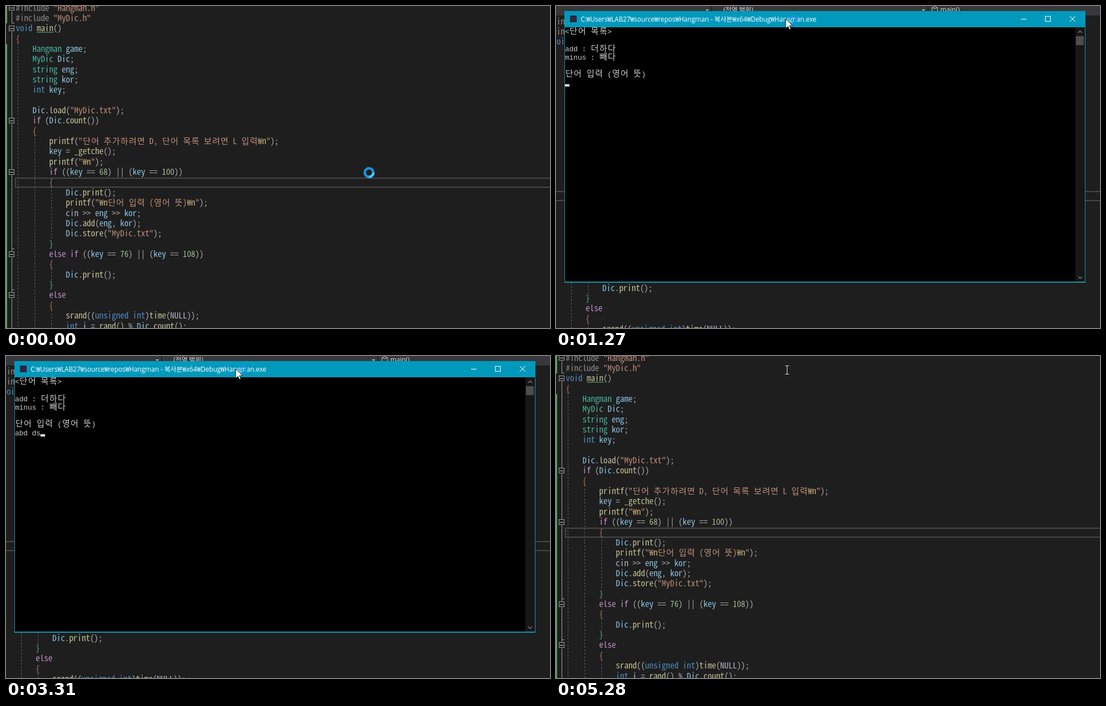
Write an HTML page with a canvas that moves like this. It is 971 px wide and 576 px high and loops after 5.48 s.

```html
<!DOCTYPE html>
<html lang="ko">
<head>
<meta charset="utf-8">
<style>
html, body { margin: 0; width: 100%; height: 100%; overflow: hidden; background: #1e1e1e; }
canvas { display: block; }
</style>
</head>
<body>
<canvas id="stage" width="971" height="576"></canvas>
<script>
const g = document.getElementById('stage').getContext('2d');
const LOOP = 5480;
const CJK = '"Noto Sans Mono CJK KR", "Noto Sans CJK KR", "Noto Sans CJK JP", sans-serif';
const CODE_FONT = '300 15px ' + CJK;
const TERM_FONT = '13px "Liberation Mono", monospace';
const UI_FONT = '11.7px "Open Sans", "Noto Sans CJK KR", sans-serif';

const SOURCE = `#include "Hangman.h"
#include "MyDic.h"
void main()
{
    Hangman game;
    MyDic Dic;
    string eng;
    string kor;
    int key;

    Dic.load("MyDic.txt");
    if (Dic.count())
    {
        printf("단어 추가하려면 D, 단어 목록 보려면 L 입력₩n");
        key = _getche();
        printf("₩n");
        if ((key == 68) || (key == 100))
        {
            Dic.print();
            printf("₩n단어 입력 (영어 뜻)₩n");
            cin >> eng >> kor;
            Dic.add(eng, kor);
            Dic.store("MyDic.txt");
        }
        else if ((key == 76) || (key == 108))
        {
            Dic.print();
        }
        else
        {
            srand((unsigned int)time(NULL));
            int i = rand() % Dic.count();`.split('\n');

const RULES = [
  [/^#include/, '#9b9b9b'],
  [/^₩n/, '#e8c98a'],
  [/^"/, '#d69d85'],
  [/^(void|int|unsigned)\b/, '#569cd6'],
  [/^(if|else)\b/, '#d8a0df'],
  [/^(Hangman|MyDic|string)\b/, '#4ec9b0'],
  [/^\w+(?=\()/, '#dcdcaa'],
  [/^\d+/, '#b5cea8'],
  [/^(NULL|cin)\b/, '#c8c8e0'],
  [/^\w+/, '#9cdcfe'],
  [/^\{/, '#c8846a'],
  [/^\}/, '#6fb3ab'],
  [/^./, '#c0c0c0']
];

function tokens(line) {
  const out = [];
  let quoted = false;
  while (line) {
    const [rule, color] = RULES.find(r => r[0].test(line));
    let text = line.match(rule)[0];
    if (quoted && text !== '₩n') text = line[0];
    const tint = quoted && text !== '₩n' ? '#d69d85' : color;
    if (text === '"') quoted = !quoted;
    out.push([text, tint]);
    line = line.slice(text.length);
  }
  return out;
}
const CODE = SOURCE.map(tokens);

const PATH = ['C:', 'Users', 'LAB27', 'source', 'repos', 'Hangman - 복사본', 'x64', 'Debug', 'Hangman.exe'];
const LIST = ['<단어 목록>', '', 'add : 더하다', 'minus : 빼다', '', '단어 입력 (영어 뜻)'];
const CLOSING = ['',
  PATH.join('\\') + '(프로세스 34740개)이(가) 종료되었습니다(코드: 0개).',
  '디버깅이 중지될 때 콘솔을 자동으로 닫으려면 [도구] -> [옵션] -> [디버깅] > [디버깅이 중지되면 자동으로 콘솔 닫기]를 사용',
  '하도록 설정합니다.',
  '이 창을 닫으려면 아무 키나 누르세요...'];
const TYPED = [[1740, 'a'], [1990, 'ab'], [2190, 'abd'], [2390, 'abd '],
  [2790, 'abd d'], [2980, 'abd ds'], [3570, 'abd dsㄷ'], [3760, 'abd ds다']];

const isWide = c => /[ㄱ-ㅎ가-힣]/.test(c);
const cells = s => [...s].reduce((n, c) => n + (isWide(c) ? 2 : 1), 0);

function rect(color, x, y, w, h) {
  g.fillStyle = color;
  g.fillRect(x, y, w, h);
}

function line(color, width, ...pts) {
  g.strokeStyle = color;
  g.lineWidth = width;
  g.beginPath();
  for (let i = 0; i < pts.length; i += 2) g.lineTo(pts[i], pts[i + 1]);
  g.stroke();
}

// Monospaced text: Hangul takes two cells.
function grid(text, x, y, pitch, font, color) {
  g.fillStyle = color;
  g.textAlign = 'center';
  for (const c of text) {
    const w = isWide(c) ? 2 * pitch : pitch;
    g.font = isWide(c) ? CODE_FONT : font;
    g.fillText(c, x + w / 2, y);
    x += w;
  }
  return x;
}

function label(text, x, y, color) {
  g.font = UI_FONT;
  g.textAlign = 'left';
  g.fillStyle = color;
  g.fillText(text, x, y);
}

function guide(x, from, to) {
  g.setLineDash([3, 3]);
  line('#666', 1, x, from, x, to);
  g.setLineDash([]);
}

function editor(debugging) {
  rect('#1e1e1e', 0, 0, 971, 576);
  g.save();
  if (debugging) g.translate(-24, 24);
  rect('#57a457', 0, -30, 2, 61);
  rect('#57a457', 0, 68, 2, 520);
  line('#a0a0a0', 1, 10.5, 0, 10.5, 30.5, 15, 30.5);
  line('#a0a0a0', 1, 10.5, 40, 10.5, 580);
  for (const y of [434.5, 507.5]) line('#a0a0a0', 1, 10.5, y, 15, y);
  for (const y of [3, 40, 205, 297, 444, 517]) {
    rect('#1e1e1e', 5, y - 5, 11, 11);
    g.strokeStyle = '#a0a0a0';
    g.strokeRect(5.5, y - 4.5, 9, 9);
    line('#d0d0d0', 1, 7, y + .5, 13, y + .5);
  }
  guide(21.5, 66, 576);
  guide(51.5, 231, 576);
  guide(81.5, 323, 418);
  guide(81.5, 470, 492);
  guide(81.5, 544, 576);
  g.strokeStyle = '#464646';
  g.lineWidth = 2;
  g.strokeRect(17, 308, 1000, 16);
  g.globalAlpha = .88;
  CODE.forEach((row, i) => {
    let x = 17.5;
    for (const [text, color] of row) x = grid(text, x, 8.5 + 18.355 * i, 7.45, CODE_FONT, color);
  });
  g.globalAlpha = 1;
  const wave = [];
  for (let x = 55; x <= 85; x += 2) wave.push(x, x % 4 === 3 ? 48 : 46);
  line('#78b878', 1, ...wave);
  g.restore();
  if (debugging) navBar();
}

function navBar() {
  rect('#38383b', 0, 0, 971, 17);
  for (const x of [277, 663]) {
    rect('#242426', x, 0, 2, 13);
    g.fillStyle = '#bbb';
    g.beginPath();
    g.moveTo(x - 10, 6);
    g.lineTo(x - 4, 6);
    g.lineTo(x - 7, 9);
    g.fill();
  }
  label('(전역 범위)', 299, 11, '#ddd');
  label('main()', 686, 11, '#ddd');
  line('#bbb', 1, 671, 3, 676, 1, 681, 3, 681, 9, 676, 11, 671, 9, 671, 3, 676, 5, 681, 3);
}

function consoleWindow(title, rows, caret) {
  rect('#1792ae', 15, 9, 930, 486);
  rect('#0099bc', 15, 9, 930, 29);
  rect('#000', 16, 38, 911, 455);
  rect('#171717', 927, 38, 17, 455);
  rect('#4d4d4d', 928, 54, 14, 16);
  line('#777', 1.5, 932, 48, 935.5, 44.5, 939, 48);
  line('#777', 1.5, 932, 484, 935.5, 487.5, 939, 484);
  rect('#30243f', 25, 17, 12, 12);
  label(title, 44, 27.5, '#fff');
  line('#fff', 1, 830, 23.5, 840, 23.5);
  g.strokeRect(873.5, 18.5, 9, 9);
  line('#fff', 1, 917, 18, 927, 28);
  line('#fff', 1, 927, 18, 917, 28);
  rows.forEach((row, i) => grid(row, 16, 50 + 15.25 * i, 7.59, TERM_FONT, '#ccc'));
  if (caret) {
    const [col, row] = caret;
    rect('#fff', 16 + col * 7.59, Math.round(48.7 + 15.25 * row), 8, 4);
  }
}

function ring(x, y, r, t) {
  const width = r * .46, a = t / 1000 * Math.PI * 2;
  g.lineWidth = width;
  for (const [color, from, to] of [['#1e90dc', 0, 6.2832], ['#4cc4f4', a, a + 1.6]]) {
    g.strokeStyle = color;
    g.beginPath();
    g.arc(x, y, r - width / 2, from, to);
    g.stroke();
  }
}

function arrow(x, y) {
  const pts = [0, 0, 0, 17, 4, 13.3, 6.7, 19, 9.2, 18, 6.6, 12.3, 12, 12];
  g.beginPath();
  for (let i = 0; i < pts.length; i += 2) g.lineTo(x + pts[i], y + pts[i + 1]);
  g.closePath();
  g.fillStyle = '#fff';
  g.fill();
  g.strokeStyle = '#000';
  g.lineWidth = .8;
  g.stroke();
}

const ease = (t, from, to) => Math.min(1, Math.max(0, (t - from) / (to - from)));
const mix = (a, b, k) => a + (b - a) * k;

function terminal(t) {
  const blink = (t + 950) % 1060 < 530;
  if (t < 410) return [[], blink && [0, 0]];
  if (t < 610) {
    const rows = ['단어 추가하려면 D, 단어 목록 보려면 L 입력', t < 550 ? '' : 'd'];
    return [rows, [cells(rows[1]), 1]];
  }
  const key = TYPED.filter(k => k[0] <= t).pop() || [0, ''];
  const rows = [...LIST, key[1]];
  if (t < 4230) return [rows, (blink || t - key[0] < 400) && [cells(key[1]), 6]];
  rows.push('한글 아님');
  if (t < 4290) return [rows, [0, 8]];
  rows.push(...CLOSING);
  return [rows, t < 4880 && [cells(CLOSING[4]), 12]];
}

function pointer(t) {
  if (t < 210) {
    const k = ease(t, 70, 280);
    ring(mix(648, 411, k), mix(298, 47, k), 10, t);
  } else if (t < 5280) {
    const k = ease(t, 350, 610), start = ease(t, 210, 330);
    const x = mix(mix(470, 398, start), 410, k), y = mix(mix(110, 47, start), 23, k);
    if (t < 4560) ring(x + 13.5, y + mix(0, 1, k), 7.5, t);
    arrow(x, y);
  } else {
    line('#ddd', 1, 409, 17.5, 416, 17.5);
    line('#ddd', 1, 409, 32.5, 416, 32.5);
    line('#ddd', 1, 412.5, 18, 412.5, 32);
  }
}

function draw(now) {
  const t = now % LOOP;
  editor(t >= 490 && t < 4490);
  if (t >= 210 && t < 5280) {
    const title = t < 4560 ? PATH.join('₩') : 'Bellowick Vantel Mosaic 디버그 콘솔';
    consoleWindow(title, ...terminal(t));
    if (t >= 4230) rect('#0b6f8a', 77, 140, 8, 3);
  }
  pointer(t);
}

const begin = performance.now();
function tick() {
  draw(performance.now() - begin);
  requestAnimationFrame(tick);
}
tick();
</script>
</body>
</html>
```
